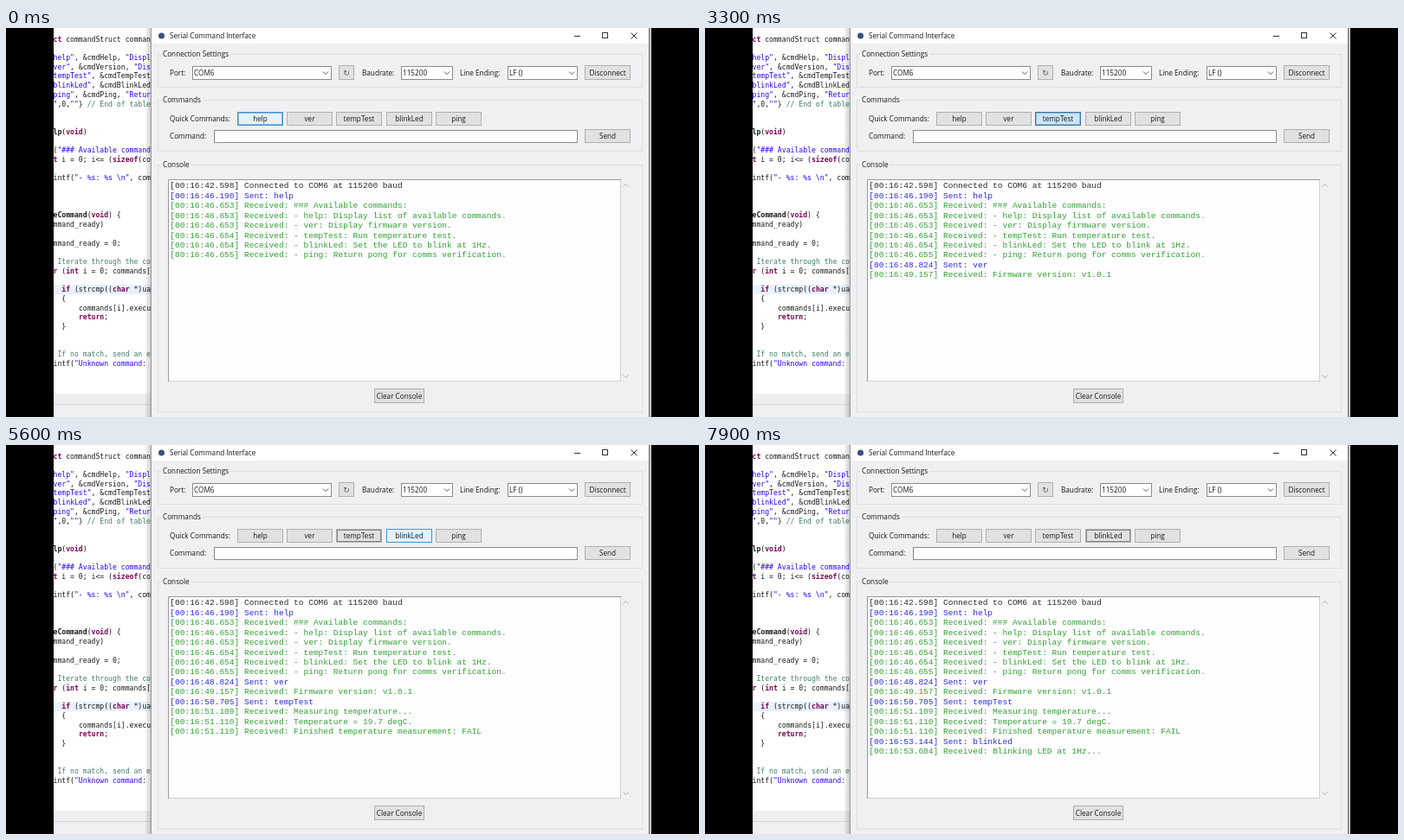
Recreate the animation shown at these times as an HTML page with a canvas. Size 800x450 px, loop 8 s.

```html
<!DOCTYPE html>
<html lang="en">
<head>
<meta charset="utf-8">
<title>Serial Command Interface</title>
<style>
  html, body { margin: 0; width: 800px; height: 450px; overflow: hidden; background: #000; }
  canvas { display: block; }
</style>
</head>
<body>
<canvas id="stage" width="800" height="450"></canvas>
<script>
const ctx = document.getElementById('stage').getContext('2d');
const LOOP = 8000;
const UI = '8.2px "Open Sans", "Noto Sans", sans-serif';
const MONO = '9.53px "Liberation Mono", monospace';
const CODE = '8.15px "DejaVu Sans Mono", monospace';
const FACE = '#f0eff1', FIELD = '#8c8c8c', INK = '#1a1a1a';

// Each chunk starts with a style letter: n plain, b bold, k keyword, s string, c comment.
const STYLES = { n: INK, b: INK, k: '#7f0055', s: '#2a00ff', c: '#3f7f5f' };
const codeLines = [
  [0, 0, 'kct|n commandStruct command'],
  [2, 0, 'shelp"|n, &cmdHelp, |s"Display'],
  [3, 0, 'sver"|n, &cmdVersion, |s"Disp'],
  [4, 0, 'stempTest"|n, &cmdTempTest'],
  [5, 0, 'sblinkLed"|n, &cmdBlinkLed'],
  [6, 0, 'sping"|n, &cmdPing, |s"Return'],
  [7, 0, 's"|n,0,|s""|n} |c// End of table'],
  [10, 0, 'blp|n(|kvoid|n)'],
  [12, 0, 'n(|s"### Available command'],
  [13, 0, 'kt|n i = 0; i<= (|ksizeof|n(com'],
  [15, 0, 'nintf(|s"- %s: %s \\n"|n, comm'],
  [19, 0, 'beCommand|n(|kvoid|n) {'],
  [20, 0, 'nmmand_ready)'],
  [22, 0, 'nmmand_ready = 0;'],
  [24, 1, 'cIterate through the com'],
  [25, 0, 'kr|n (|kint|n i = 0; commands['],
  [27, 2, 'kif|n (strcmp((|kchar|n *)uar'],
  [28, 2, 'n{'],
  [29, 6, 'ncommands[i].execut'],
  [30, 6, 'kreturn|n;'],
  [31, 2, 'n}'],
  [34, 1, 'cIf no match, send an er'],
  [35, 0, 'nintf(|s"Unknown command: ']
];

// Seconds past 00:16, message. A line shows once its own clock time is reached.
const CLOCK_START = 47.3;
const log = [
  [42.598, 'Connected to COM6 at 115200 baud'],
  [46.190, 'Sent: help'],
  [46.653, 'Received: ### Available commands:'],
  [46.653, 'Received: - help: Display list of available commands.'],
  [46.653, 'Received: - ver: Display firmware version.'],
  [46.654, 'Received: - tempTest: Run temperature test.'],
  [46.654, 'Received: - blinkLed: Set the LED to blink at 1Hz.'],
  [46.655, 'Received: - ping: Return pong for comms verification.'],
  [48.824, 'Sent: ver'],
  [49.157, 'Received: Firmware version: v1.0.1'],
  [50.705, 'Sent: tempTest'],
  [51.109, 'Received: Measuring temperature...'],
  [51.110, 'Received: Temperature = 19.7 degC.'],
  [51.110, 'Received: Finished temperature measurement: FAIL'],
  [53.144, 'Sent: blinkLed'],
  [53.684, 'Received: Blinking LED at 1Hz...']
];

const quick = ['help', 'ver', 'tempTest', 'blinkLed', 'ping'];
const hovers = [[0, 'help'], [600, ''], [700, 'ver'], [2700, ''], [2800, 'tempTest'],
  [4150, ''], [4250, 'entry'], [4500, 'blinkLed'], [7100, '']];
const focuses = [[0, 'help'], [1400, 'ver'], [3300, 'tempTest'], [5700, 'blinkLed']];
const PRESS = 120;

const latest = (events, t) => events.filter(e => e[0] <= t).pop();

function rect(x, y, w, h, color) {
  ctx.fillStyle = color;
  ctx.fillRect(x, y, w, h);
}

function box(x, y, w, h, border, fill) {
  if (fill) rect(x, y, w, h, fill);
  ctx.strokeStyle = border;
  ctx.strokeRect(x + .5, y + .5, w - 1, h - 1);
}

function text(str, x, y, font = UI, color = INK, align = 'left') {
  ctx.font = font;
  ctx.fillStyle = color;
  ctx.textAlign = align;
  ctx.fillText(str, x, y);
}

function path(points, color) {
  ctx.strokeStyle = color;
  ctx.beginPath();
  points.forEach(([x, y]) => ctx.lineTo(x, y));
  ctx.stroke();
}

function chevron(x, y, dir, color) {
  path([[x - 3, y - 1.5 * dir], [x, y + 1.5 * dir], [x + 3, y - 1.5 * dir]], color);
}

function group(label, y, h) {
  box(175, y, 560, h, '#dfdfdf');
  ctx.font = UI;
  rect(179, y - 3, ctx.measureText(label).width + 4, 8, FACE);
  text(label, 181, y + 2.5);
}

function combo(x, w, value) {
  box(x, 44, w, 16, FIELD, '#fff');
  text(value, x + 2, 55);
  chevron(x + w - 7, 52, 1, '#555');
}

function button(label, x, y, w, h, { hover, focus, pressed } = {}) {
  const border = pressed ? '#3a78ad' : hover ? '#3c94dc' : '#b0b0b0';
  box(x, y, w, h, border, pressed ? '#cce4f7' : hover ? '#e5f1fb' : '#e1e1e1');
  if (focus) box(x + 1, y + 1, w - 2, h - 2, hover ? '#8db4d2' : '#858585');
  text(label, x + w / 2, y + h / 2 + 3, UI, INK, 'center');
}

function drawEditor() {
  rect(55, 0, 690, 450, '#fff');
  rect(55, 297, 113, 11, '#e8f2fe');
  for (const [row, col, line] of codeLines) {
    let x = 54.5 + col * 4.9;
    for (const chunk of line.split('|')) {
      const style = chunk[0], str = chunk.slice(1);
      text(str, x, 15.5 + row * 10.73, ('bk'.includes(style) ? 'bold ' : '') + CODE, STYLES[style]);
      x += ctx.measureText(str).width;
    }
  }
  rect(55, 423, 113, 27, FACE);
  rect(55, 435, 113, 1, '#d4d4d4');
  const shadow = ctx.createLinearGradient(160, 0, 168, 0);
  shadow.addColorStop(0, 'rgba(0,0,0,0)');
  shadow.addColorStop(1, 'rgba(0,0,0,.22)');
  rect(160, 0, 8, 450, shadow);
}

function drawWindow() {
  rect(167, 0, 575, 450, FACE);
  rect(167, 0, 1, 450, '#999');
  rect(168, 0, 574, 18, '#fff');
  rect(742, 0, 1, 450, '#666');
  rect(743, 0, 2, 450, '#c4c4c4');
  ctx.fillStyle = '#35557a';
  ctx.beginPath();
  ctx.arc(179.5, 9, 3.5, 0, 7);
  ctx.fill();
  text('Serial Command Interface', 189, 12);
  rect(656, 9, 7, 1, '#333');
  box(688, 5, 7, 7, '#333');
  path([[721.5, 5.5], [728.5, 12.5]], '#333');
  path([[728.5, 5.5], [721.5, 12.5]], '#333');

  group('Connection Settings', 30, 39);
  text('Port:', 189, 55);
  combo(215, 161, 'COM6');
  button('', 384, 43, 18, 17);
  text('↻', 393, 55, '9px "DejaVu Sans", sans-serif', '#555', 'center');
  text('Baudrate:', 411, 55);
  combo(456, 60, '115200');
  text('Line Ending:', 524, 55);
  combo(579, 81, 'LF ()');
  button('Disconnect', 668, 43, 53, 17);
}

function drawCommands(t) {
  const hover = latest(hovers, t)[1];
  const [since, focus] = latest(focuses, t);
  group('Commands', 83, 60);
  text('Quick Commands:', 189, 108);
  quick.forEach((name, i) => button(name, Math.round(266.6 + i * 57.3), 97, 53, 16, {
    hover: name === hover,
    focus: name === focus,
    pressed: name === focus && since > 0 && t - since < PRESS
  }));
  text('Command:', 189, 128);
  box(240, 118, 420, 15, hover === 'entry' ? '#444' : FIELD, '#fff');
  button('Send', 668, 117, 53, 16);
}

function drawConsole(t) {
  group('Console', 158, 287);
  box(187, 175, 523, 234, '#d0d0d0', '#fefdff');
  path([[187.5, 409], [187.5, 175.5], [710, 175.5]], '#999');
  rect(710, 175, 11, 234, FACE);
  chevron(715.5, 182, -1, '#b0b0b0');
  chevron(715.5, 403, 1, '#b0b0b0');
  log.forEach(([stamp, message], i) => {
    if (stamp - CLOCK_START > t / 1000) return;
    const color = { S: '#2c2ce8', R: '#32a232' }[message[0]] || '#2a2a2a';
    text(`[00:16:${stamp.toFixed(3)}] ${message}`, 189.3, 185.2 + i * 11.46, MONO, color);
  });
  button('Clear Console', 425, 417, 58, 17);
}

function frame(now) {
  const t = now % LOOP;
  rect(0, 0, 800, 450, '#000');
  ctx.save();
  ctx.beginPath();
  ctx.rect(55, 0, 690, 450);
  ctx.clip();
  drawEditor();
  drawWindow();
  drawCommands(t);
  drawConsole(t);
  ctx.restore();
  requestAnimationFrame(frame);
}
frame(0);
</script>
</body>
</html>
```
